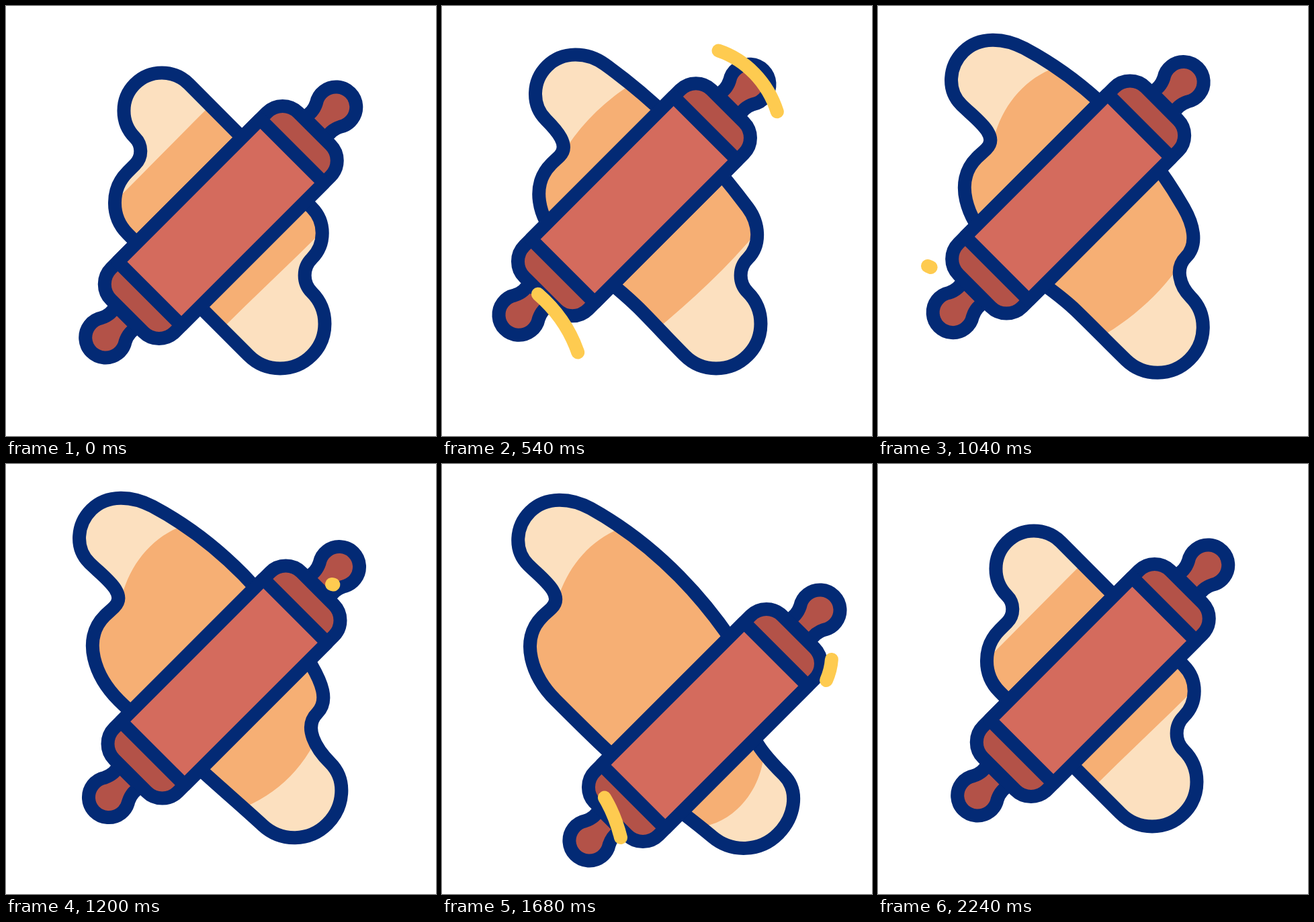
These frames come from a looping animation (640x640 px, 2.6 s). An HTML page:

```html
<!DOCTYPE html>
<html lang="en">
<head>
<meta charset="utf-8">
<title>Rolling pin</title>
<style>
  html, body { margin: 0; height: 100%; overflow: hidden; background: #fff; }
  svg { display: block; width: 100vw; height: 100vh; }
  .line { stroke: #032a75; stroke-width: 20; stroke-linejoin: round; }
  .dark { fill: #b35248; }
  .mark { fill: none; stroke: #fecb50; stroke-width: 20; stroke-linecap: round; }
</style>
</head>
<body>
<svg viewBox="0 0 640 640">
  <defs>
    <clipPath id="inside"><path class="dough"/></clipPath>
    <path id="handle" class="line dark" d="M198-23Q212-18 226-25A30 30 0 1 1 226 25Q212 18 198 23Z"/>
  </defs>
  <path class="dough" fill="#fce0bf"/>
  <path id="band" fill="#f6af74" clip-path="url(#inside)"/>
  <path class="dough line" fill="none"/>
  <g id="pin">
    <use href="#handle"/>
    <use href="#handle" transform="scale(-1 1)"/>
    <rect class="line dark" x="-197" y="-67" width="394" height="134" rx="33"/>
    <rect class="line" x="-150" y="-67" width="300" height="134" fill="#d46b5d"/>
  </g>
  <g id="marks"></g>
</svg>
<script>
const LOOP = 2600;
const REST = [0, 0, 0];

// A knot is [x, y, heading in degrees], then its change as the pin
// rolls up (rise) and as it rolls down (spread).
const knot = (at, rise = REST, spread = REST) => ({ at, rise, spread });

const dough = [
  knot([455, 300, 225], [0, 0, 15]),
  knot([272, 116, 225], [-54, -53, -17]),
  knot([192, 116, 135], [-65, -48, 0]),
  knot([192, 196, 45], [-68, -49, 0]),
  knot([192, 236, 135], [-31, -23, 0]),
  knot([181, 247, 135], [-34, -21, 0]),
  knot([181, 339, 45], [-13, 13, 0]),
  knot([293, 452, 45], [0, -4, 0], [8, 28, -6]),
  knot([361, 520, 45], REST, [44, 37, -5]),
  knot([455, 520, -45], REST, [48, 33, 0]),
  knot([455, 426, 225], REST, [57, 39, 0]),
  knot([455, 376, -45], REST, [17, -11, 0])
];
const bandTop = [
  knot([306, 146, 135], [-43, -54, 25]),
  knot([165, 288, 135], [8, -93, -30])
];
const bandBottom = [
  knot([316, 486, -45], [0, -3, 10], [69, 62, 30]),
  knot([475, 331, -45], [-5, 2, -10], [10, 87, -40])
];
const pinKnot = knot([319.75, 322, -45], [-61.5, -61.5, 0], [137.5, 133, 0]);

const pose = ({ at, rise, spread }, up, down) =>
  at.map((v, i) => v + rise[i] * up + spread[i] * down);

// Joins two posed knots by a near circular arc
function arc([x0, y0, a], [x1, y1, b]) {
  const rad = Math.PI / 180;
  const bend = Math.abs(Math.cos((b - a) / 2 * rad));
  const reach = Math.hypot(x1 - x0, y1 - y0) * 2 / 3 / (1 + bend);
  const handle = (x, y, angle, d) =>
    [x + d * Math.cos(angle * rad), y + d * Math.sin(angle * rad)];
  return 'C' + [...handle(x0, y0, a, reach), ...handle(x1, y1, b, -reach), x1, y1]
    .map(v => v.toFixed(2));
}

const trace = knots => `${knots[0].slice(0, 2)}` +
  knots.slice(1).map((k, i) => arc(knots[i], k)).join('');

// Trails: both end knots, then start and end times of head and tail
const marks = [
  [[502, 169, -103], [344, 64, -194], [250, 720], [480, 900]],
  [[203, 518, -108], [74, 387, -158], [250, 780], [500, 1100]],
  [[485, 179, 12], [572, 322, 114], [1180, 1495], [1400, 1780]],
  [[150, 441, -5], [266, 556, 76], [1230, 1640], [1420, 1860]]
].map(([a, b, head, tail]) => {
  const el = document.createElementNS('http://www.w3.org/2000/svg', 'path');
  el.setAttribute('d', 'M' + trace([a, b]));
  el.setAttribute('class', 'mark');
  document.getElementById('marks').append(el);
  return { el, head, tail, length: el.getTotalLength() };
});

const ease = (t, from, to) => {
  const s = Math.min(1, Math.max(0, (t - from) / (to - from)));
  return s * s * (3 - 2 * s);
};

const outlines = document.querySelectorAll('.dough');
const band = document.getElementById('band');
const pin = document.getElementById('pin');

function draw(now) {
  const t = now % LOOP;
  const back = ease(t, 1580, 2240);
  const up = ease(t, 200, 840) - back;
  const down = ease(t, 840, 1580) - back;
  const posed = knots => knots.map(k => pose(k, up, down));

  const ring = posed(dough);
  const outline = `M${trace([...ring, ring[0]])}Z`;
  outlines.forEach(el => el.setAttribute('d', outline));
  band.setAttribute('d',
    `M${trace(posed(bandTop))}L60,340 ${trace(posed(bandBottom))}L500,150Z`);

  const [x, y, angle] = pose(pinKnot, up, down);
  pin.setAttribute('transform', `translate(${x} ${y}) rotate(${angle})`);

  for (const { el, head, tail, length } of marks) {
    const end = ease(t, ...head) * length;
    const begin = ease(t, ...tail) * length;
    el.style.display = end - begin > 0.5 ? '' : 'none';
    el.style.strokeDasharray = `${end - begin} ${length * 2}`;
    el.style.strokeDashoffset = -begin;
  }
}

const origin = performance.now();
function tick() {
  draw(performance.now() - origin);
  requestAnimationFrame(tick);
}
tick();
</script>
</body>
</html>
```
